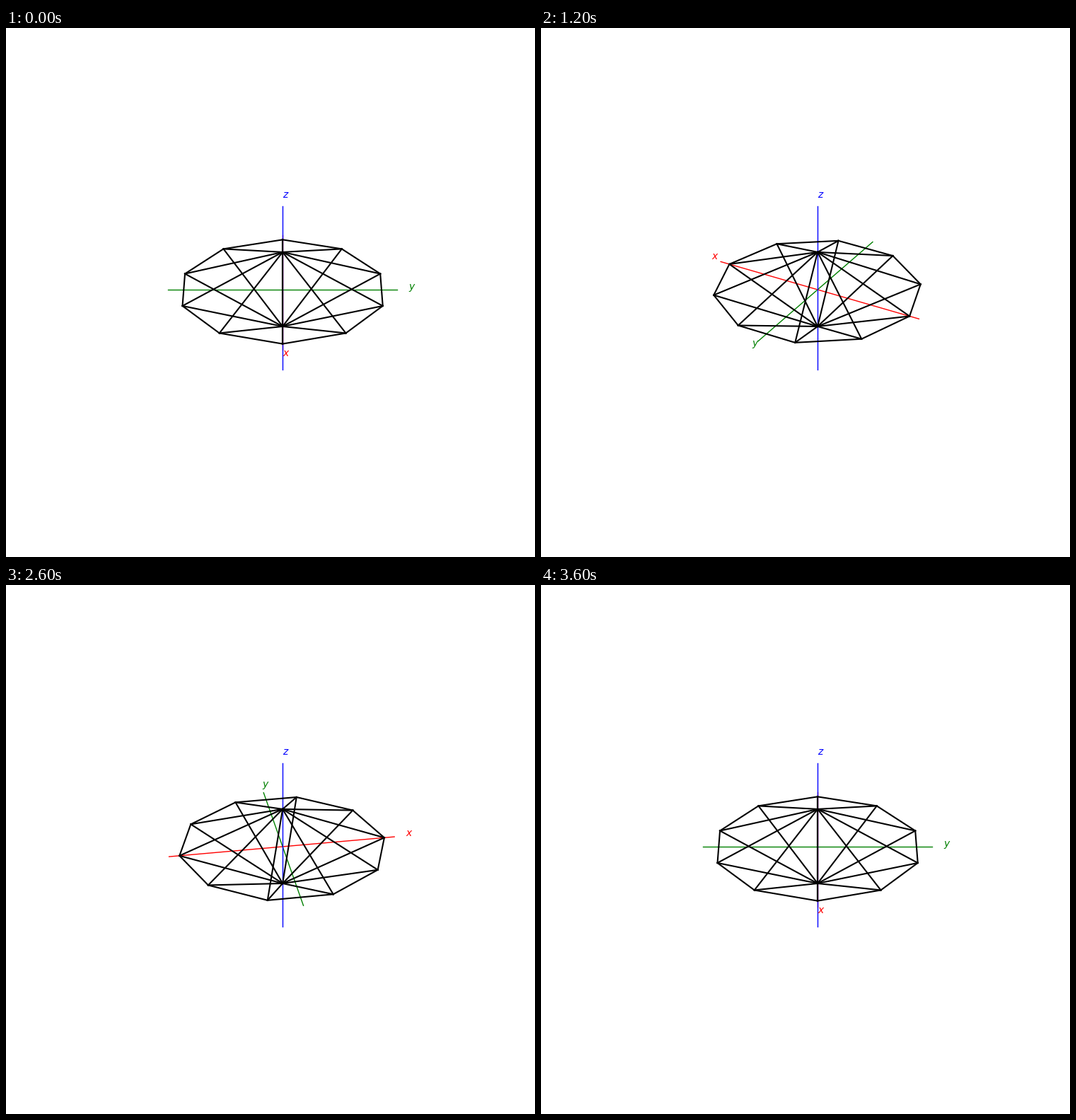
A matplotlib script that plays this animation: 748 px wide and 748 px high, repeating every 3.7 s.

```python
import numpy as np
import matplotlib.pyplot as plt
from matplotlib.animation import FuncAnimation

SIZE, DPI = 748, 100
FRAMES, INTERVAL, STEP = 37, 100, 10
ORIGIN = np.array([391.13, 378.04])
SCALE, DIST = 3113.3, 10.0
ELEV = np.radians(30)

AXIS_XY = 4 / 7 / 1.1     # half lengths of the axes
AXIS_Z = 3 / 7
RADIUS = AXIS_XY / 1.1    # equator of the bipyramid
HEIGHT = AXIS_Z / 2.2
SIDES = 10


def project(points, azim):
    """Perspective projection of 3D points to pixels, y upwards."""
    x, y, z = np.asarray(points, float).T
    ca, sa = np.cos(azim), np.sin(azim)
    ce, se = np.cos(ELEV), np.sin(ELEV)
    right = y * ca - x * sa
    toward = x * ca + y * sa
    up = z * ce - toward * se
    depth = DIST - toward * ce - z * se
    return ORIGIN + SCALE * np.column_stack([right, up]) / depth[:, None]


def bipyramid_edges():
    angles = 2 * np.pi * np.arange(SIDES) / SIDES
    ring = [(RADIUS * np.cos(a), RADIUS * np.sin(a), 0) for a in angles]
    edges = []
    for i, vertex in enumerate(ring):
        edges.append((vertex, ring[(i + 1) % SIDES]))
        edges += [(vertex, (0, 0, h)) for h in (HEIGHT, -HEIGHT)]
    return edges


fig = plt.figure(figsize=(SIZE / DPI, SIZE / DPI), dpi=DPI, facecolor="white")
ax = fig.add_axes([0, 0, 1, 1])
ax.set_xlim(0, SIZE)
ax.set_ylim(0, SIZE)
ax.axis("off")

segments, labels = [], []


def add_segment(start, end, color, width):
    line, = ax.plot([], [], color=color, lw=width)
    segments.append((line, (start, end)))


tips = np.diag([AXIS_XY, AXIS_XY, AXIS_Z])
for tip, name, color in zip(tips, "xyz", ("red", "green", "blue")):
    add_segment(-tip, tip, color, 1)
    label = ax.text(0, 0, f"${name}$", color=color, fontsize=10)
    labels.append((label, 1.1 * tip))

for start, end in bipyramid_edges():
    add_segment(start, end, "black", 1.5)


def update(i):
    azim = np.radians(STEP * i % 360)
    for line, ends in segments:
        line.set_data(*project(ends, azim).T)
    for label, point in labels:
        label.set_position(project([point], azim)[0])
    return [item for item, _ in segments + labels]


anim = FuncAnimation(fig, update, frames=FRAMES, interval=INTERVAL,
                     repeat=True, repeat_delay=0)
plt.show()
```
